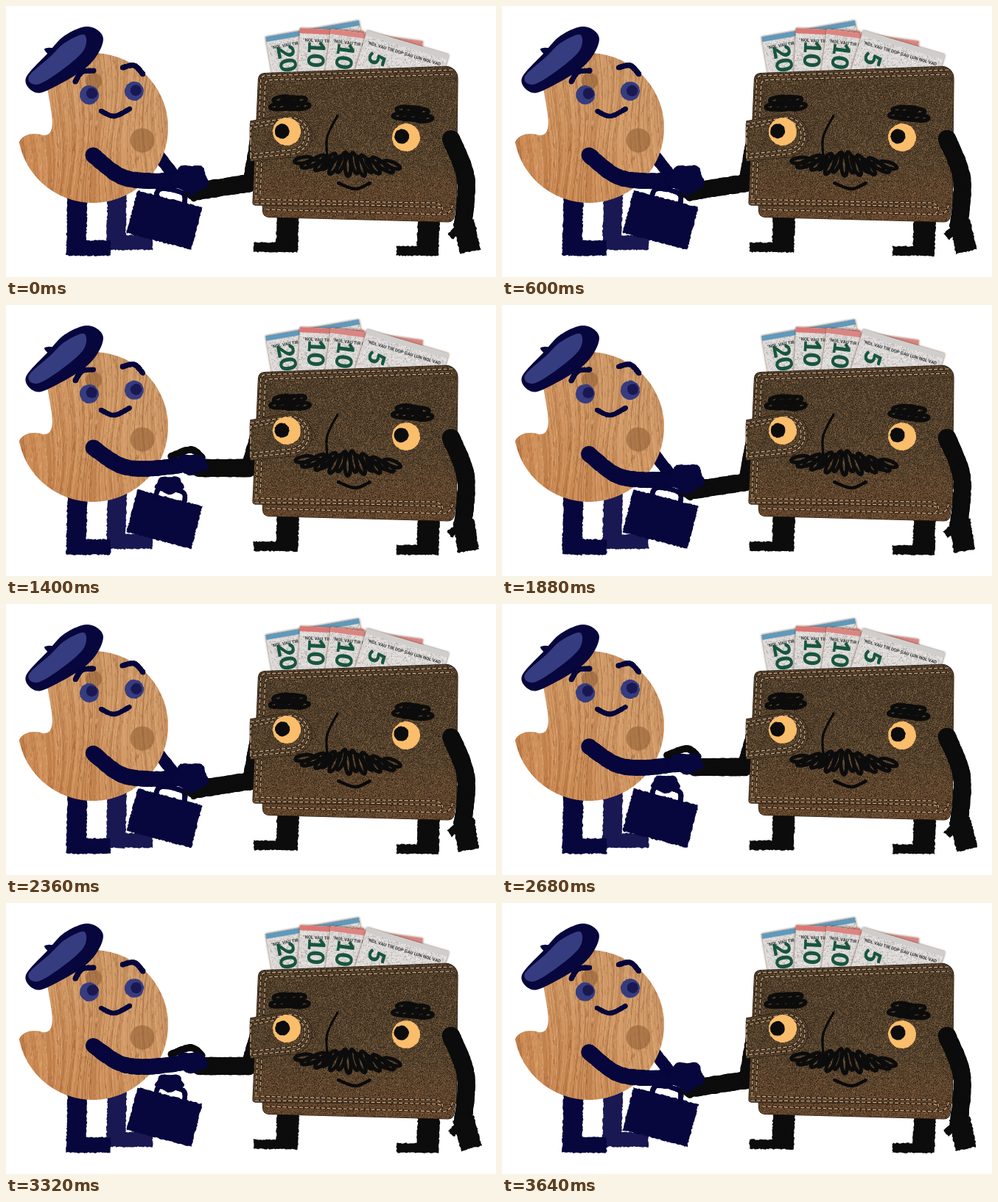
Write an HTML page with a canvas that moves like this. It is 665 px wide and 369 px high and loops after 3760 ms.

```html
<!DOCTYPE html>
<html lang="en">
<head>
<meta charset="utf-8">
<title>Handshake</title>
<style>
  html, body { margin: 0; width: 100%; height: 100%; overflow: hidden; background: #fff; }
  canvas { display: block; width: 665px; height: 369px; }
</style>
</head>
<body>
<canvas id="stage" width="665" height="369"></canvas>
<script>
const W = 665, H = 369, LOOP = 3760;
const NAVY = '#07073d', INDIGO = '#1a1852', IRIS = '#363c80', BLACK = '#0c0c0c', AMBER = '#fabd6b';
const ctx = document.getElementById('stage').getContext('2d');

let seed = 1;
function rnd() {
  seed = (seed + 0x6d2b79f5) | 0;
  let n = Math.imul(seed ^ (seed >>> 15), 1 | seed);
  n = (n + Math.imul(n ^ (n >>> 7), 61 | n)) ^ n;
  return ((n ^ (n >>> 14)) >>> 0) / 4294967296;
}
const jit = a => (rnd() * 2 - 1) * a;
const pick = list => list[Math.floor(rnd() * list.length)];
const mix = (a, b, t) => a + (b - a) * t;

function layer(draw) {
  const c = document.createElement('canvas');
  c.width = W; c.height = H;
  draw(c.getContext('2d'));
  return c;
}

// Polygon with ragged paper-cut edges.
function rough(pts, color, amount = 0.8) {
  ctx.beginPath();
  pts.forEach(([x, y], i) => {
    const [u, v] = pts[(i + 1) % pts.length];
    const n = Math.max(1, Math.round(Math.hypot(u - x, v - y) / 2));
    for (let k = 0; k < n; k++) ctx.lineTo(mix(x, u, k / n) + jit(amount), mix(y, v, k / n) + jit(amount));
  });
  ctx.fillStyle = color;
  ctx.fill();
}

// Thick straight bar with square ends.
function slab(x, y, u, v, width, color) {
  const k = width / 2 / Math.hypot(u - x, v - y);
  const nx = (y - v) * k, ny = (u - x) * k;
  rough([[x + nx, y + ny], [u + nx, v + ny], [u - nx, v - ny], [x - nx, y - ny]], color);
}

// Ellipse whose rim can carry knuckle-like bumps.
function lump(x, y, rx, ry, color, bumps = 0) {
  const pts = Array.from({ length: 32 }, (_, i) => {
    const a = i * Math.PI / 16, s = 1 + 0.1 * Math.sin(bumps * a);
    return [x + rx * s * Math.cos(a), y + ry * s * Math.sin(a)];
  });
  rough(pts, color, 0.4);
}

function spline(a, b, d, e, t) {
  return 0.5 * (2 * b + (d - a) * t + (2 * a - 5 * b + 4 * d - e) * t * t + (3 * b - a - 3 * d + e) * t * t * t);
}

function brush(pts, width, color, amount = 0.5) {
  ctx.fillStyle = color;
  const at = i => pts[Math.max(0, Math.min(pts.length - 1, i))];
  for (let i = 0; i < pts.length - 1; i++) {
    const near = [at(i - 1), at(i), at(i + 1), at(i + 2)];
    for (let t = 0; t <= 1; t += 0.03) {
      const [x, y] = [0, 1].map(q => spline(...near.map(p => p[q]), t));
      ctx.beginPath();
      ctx.arc(x, y, width / 2 + jit(amount), 0, 7);
      ctx.fill();
    }
  }
}

// Closed smooth shape through a few points.
function blob(c, pts, color) {
  const at = i => pts[(i + pts.length) % pts.length];
  c.beginPath();
  pts.forEach((_, i) => {
    const near = [at(i - 1), at(i), at(i + 1), at(i + 2)];
    for (let t = 0; t < 1; t += 0.1) c.lineTo(...[0, 1].map(q => spline(...near.map(p => p[q]), t)));
  });
  c.fillStyle = color;
  c.fill();
}

function palettePath() {
  const p = new Path2D();
  p.arc(118, 166, 102, -2.2, 2.95);
  p.bezierCurveTo(24, 172, 42, 173, 50, 176);
  p.bezierCurveTo(72, 178, 60, 140, 56, 110);
  p.closePath();
  return p;
}

const palette = layer(c => {
  c.save();
  c.clip(palettePath());
  const base = c.createLinearGradient(20, 260, 220, 80);
  base.addColorStop(0, '#c67f48');
  base.addColorStop(0.6, '#cf9865');
  base.addColorStop(1, '#c89668');
  c.fillStyle = base;
  c.fillRect(0, 0, 230, 280);
  for (let x = 5; x < 235; x += 1.6) {
    c.strokeStyle = pick(['#8f5428', '#a9683a', '#e6b583', '#dba572']);
    c.globalAlpha = 0.15 + rnd() * 0.35;
    c.lineWidth = 0.6 + rnd();
    c.beginPath();
    for (let y = 60; y < 275; y += 6) c.lineTo(x + 5 * Math.sin(y / 38 + x / 28) + jit(0.6), y);
    c.stroke();
  }
  c.globalAlpha = 0.35;
  for (let i = 0; i < 1000; i++) {
    c.fillStyle = pick(['#8d542b', '#edc497']);
    c.fillRect(15 + rnd() * 205, 62 + rnd() * 205, 1, 2 + rnd() * 6);
  }
  c.globalAlpha = 0.55;
  c.fillStyle = '#8e5c32';
  for (const [x, y, r] of [[185, 183, 16.5], [119, 102, 11]]) {
    c.beginPath();
    c.arc(x, y, r, 0, 7);
    c.fill();
  }
  c.restore();
  blob(c, [[27, 98], [56, 65], [80, 40], [112, 28], [132, 45], [112, 81], [60, 113], [38, 117]], NAVY);
  blob(c, [[52, 59], [62, 57], [76, 62], [62, 68]], NAVY);
  blob(c, [[31, 96], [60, 69], [80, 50], [106, 39], [105, 61], [72, 90], [42, 107]], IRIS);
});

// Polygon path with one corner radius per point.
function cornered(pts, radii) {
  const p = new Path2D(), n = pts.length;
  const last = pts[n - 1];
  p.moveTo((last[0] + pts[0][0]) / 2, (last[1] + pts[0][1]) / 2);
  pts.forEach((pt, i) => p.arcTo(...pt, ...pts[(i + 1) % n], radii[i]));
  p.closePath();
  return p;
}

// Banknote hung from its top-left corner; everything on it is placed in its own axes.
function bill(c, x, y, turn, length, strip, numeral) {
  c.save();
  c.translate(x, y);
  c.rotate(turn);
  c.shadowColor = '#6b4a32';
  c.shadowBlur = 3;
  c.fillStyle = '#dddad8';
  c.fillRect(0, 0, length, 66);
  c.shadowBlur = 0;
  c.beginPath();
  c.rect(0, 0, length, 66);
  c.clip();
  for (let i = 0; i < length * 14; i++) {
    c.fillStyle = pick(['#f6f3f0', '#b3b5b6', '#e4cfc4', '#c0c7cc', '#a89a90']);
    c.fillRect(rnd() * length, rnd() * 66, 1.2, 1.2);
  }
  c.fillStyle = strip;
  c.fillRect(0, 0, length, 7);
  c.fillStyle = '#33383b';
  c.font = 'bold 6px Roboto, sans-serif';
  c.fillText('°NOL VAU TIR DOP GAU LUN NOL VAD', 5, 18);
  c.translate(22, 34);
  c.rotate(Math.PI / 2);
  c.fillStyle = '#17553f';
  c.font = '900 32px Lato, sans-serif';
  c.textAlign = 'center';
  c.textBaseline = 'middle';
  c.fillText(numeral, 0, 0);
  c.restore();
}

function stitch(c, path) {
  for (const [color, width, dash] of [['#2f2116', 2.4, []], ['#d5b48c', 1.2, [5, 2.5]]]) {
    c.strokeStyle = color;
    c.lineWidth = width;
    c.setLineDash(dash);
    c.stroke(path);
  }
  c.setLineDash([]);
}

function leather(c, path) {
  c.save();
  c.strokeStyle = '#2a1d13';
  c.lineWidth = 1.5;
  c.stroke(path);
  c.clip(path);
  const g = c.createLinearGradient(0, 80, 0, 295);
  g.addColorStop(0, '#4b3b29');
  g.addColorStop(0.6, '#52402b');
  g.addColorStop(1, '#66452b');
  c.fillStyle = g;
  c.fillRect(0, 0, W, H);
  c.globalAlpha = 0.6;
  for (let i = 0; i < 34000; i++) {
    c.fillStyle = pick(['#201812', '#352818', '#7d6143', '#96704a']);
    c.fillRect(330 + Math.floor(rnd() * 285), 78 + Math.floor(rnd() * 218), 1, 1);
  }
  c.restore();
}

const wallet = layer(c => {
  bill(c, 352, 42, -0.175, 129, '#6199bb', '20');
  bill(c, 399, 30, 0.05, 87, '#db7775', '10');
  bill(c, 441, 31, 0.135, 126, '#dc8582', '10');
  bill(c, 490, 33, 0.29, 116, '#cfcecd', '5');

  leather(c, cornered([[348, 262], [611, 262], [607, 294], [349, 287]], [0, 0, 8, 8]));
  leather(c, cornered([[343, 92], [613, 82], [611, 274], [335, 271]], [8, 16, 4, 3]));
  for (const inset of [4, 10]) {
    const edge = new Path2D();
    edge.moveTo(335 + inset, 266 - inset);
    edge.arcTo(342 + inset, 91 + inset, 480, 87 + inset, 6);
    edge.lineTo(606, 83 + inset);
    stitch(c, edge);
    stitch(c, new Path2D(`M338 ${273 - inset}Q480 ${272 - inset / 2} 584 ${278 - inset}Q600 275 586 284`));
  }
  stitch(c, new Path2D('M353 277L590 284Q606 284 606 268'));

  for (const inset of [0, 4, 9]) {
    const flap = cornered([[332, 157 + inset], [415 - inset, 143 + inset], [415 - inset, 203 - inset], [332, 211 - inset]],
      [0, 29 - inset, 29 - inset, 0]);
    (inset ? stitch : leather)(c, flap);
  }
});

function hair(x, y, length, turn) {
  ctx.save();
  ctx.translate(x + jit(0.7), y + jit(0.7));
  ctx.rotate(turn + jit(0.05));
  ctx.beginPath();
  ctx.ellipse(0, 0, length, 4, 0, 0, 7);
  ctx.lineWidth = 5;
  ctx.strokeStyle = BLACK;
  ctx.stroke();
  ctx.restore();
}

function bushyBrow(x, y, turn) {
  for (let i = -3; i <= 3; i++) {
    hair(x + i * 5, y + i * 5 * turn + (i % 2 ? 5 : -4), 12, turn - 0.15);
  }
}

function moustache() {
  for (let i = -7; i <= 7; i++) {
    const u = i / 7, flat = 1 - Math.abs(u);
    const turn = u < 0 ? -0.15 - 1.25 * flat : 0.35 + 1.15 * flat;
    hair(464 + u * 60, 215 + 3 * u + (i % 2 ? -2 : 2), 12 + 3 * flat, turn);
  }
}

function eye(x, y, r, white, lookX, lookY, pupilSize, pupil) {
  lump(x, y, r, r, white);
  lump(x + lookX + jit(0.8), y + lookY + jit(0.6), pupilSize, pupilSize, pupil);
}

function walletFace() {
  eye(381, 171, 19, AMBER, -6.5, -0.5, 10, BLACK);
  eye(543, 179, 19, AMBER, -6, -2, 10, BLACK);
  bushyBrow(385, 132, 0.02);
  bushyBrow(552, 146, 0.13);
  brush([[450, 149], [436, 178], [436, 205]], 3, BLACK, 0.3);
  moustache();
  brush([[451, 241], [474, 249], [494, 241]], 4, BLACK, 0.3);
}

function paletteFace() {
  eye(113, 121, 13, IRIS, 4, -2, 7.5, INDIGO);
  eye(174, 116, 13, IRIS, 3, -1, 7.5, INDIGO);
  brush([[94, 103], [103, 90], [119, 88]], 6.5, NAVY, 0.4);
  brush([[158, 84], [174, 81], [186, 93]], 6.5, NAVY, 0.4);
  brush([[129, 143], [147, 150], [168, 140]], 6, NAVY, 0.4);
}

function leg(x, top, bottom, width, toe, shoe, color) {
  slab(x, top, x - 2, bottom, width, color);
  slab(x, bottom - shoe / 2, toe, bottom - shoe / 2, shoe, color);
}

function walletArms(lift) {
  const elbow = [mix(331, 329, lift), mix(241, 222, lift)];
  const wrist = [mix(260, 262, lift), mix(252, 222, lift)];
  brush([[343, 172], elbow], 20, BLACK);
  brush([elbow, wrist], 24, BLACK);
}

function freeArm() {
  brush([[604, 181], [624, 235], [620, 300]], 24, BLACK);
  ctx.save();
  ctx.translate(621, 295);
  ctx.rotate(jit(0.09));
  slab(0, -2, 7, 40, 29, BLACK);
  slab(-2, 4, -19, 18, 11, BLACK);
  ctx.restore();
}

function briefcase(lift) {
  slab(171, 280, 259, 303, 60, NAVY);
  brush([[203, 262], [210, 249], [240, 255], [242, 270]], 6, NAVY);
  if (lift) lump(222, 245, 19, 12, NAVY, 5);
}

function handshake(lift) {
  const y = mix(237, 218, lift);
  if (lift) brush([[224, 206], [251, 197], [266, 208]], 9, BLACK);
  else lump(255, 253, 13, 12, BLACK, 5);
  brush([[118, mix(203, 194, lift)], [154, mix(231, 218, lift)], [190, mix(238, 223, lift)], [238, y]], 21, NAVY);
  lump(251, y - 1, 23, mix(20, 14, lift), NAVY, 5);
}

function draw(step) {
  const lift = step % 4 === 1 || step % 4 === 2 ? 1 : 0;
  seed = 977 + step * 7919;
  ctx.fillStyle = '#fff';
  ctx.fillRect(0, 0, W, H);
  walletArms(lift);
  leg(383, 280, 335, 30, 336, 13, BLACK);
  leg(574, 286, 340, 30, 530, 13, BLACK);
  ctx.drawImage(wallet, 0, 0);
  walletFace();
  freeArm();
  leg(151, 255, 332, 26, 199, 20, INDIGO);
  leg(97, 258, 340, 27, 142, 21, NAVY);
  if (!lift) brush([[208, 205], [234, 238]], 16, NAVY);
  ctx.drawImage(palette, 0, 0);
  paletteFace();
  briefcase(lift);
  handshake(lift);
}

let shown = -1;
function tick(now) {
  const t = now % LOOP;
  // The drawings run on a 160 ms beat with one extra step late in the loop.
  const step = Math.floor((t + 40) / 160) + (t >= 2600 ? 1 : 0);
  if (step !== shown) draw(shown = step);
  requestAnimationFrame(tick);
}
tick(performance.now());
</script>
</body>
</html>
```
